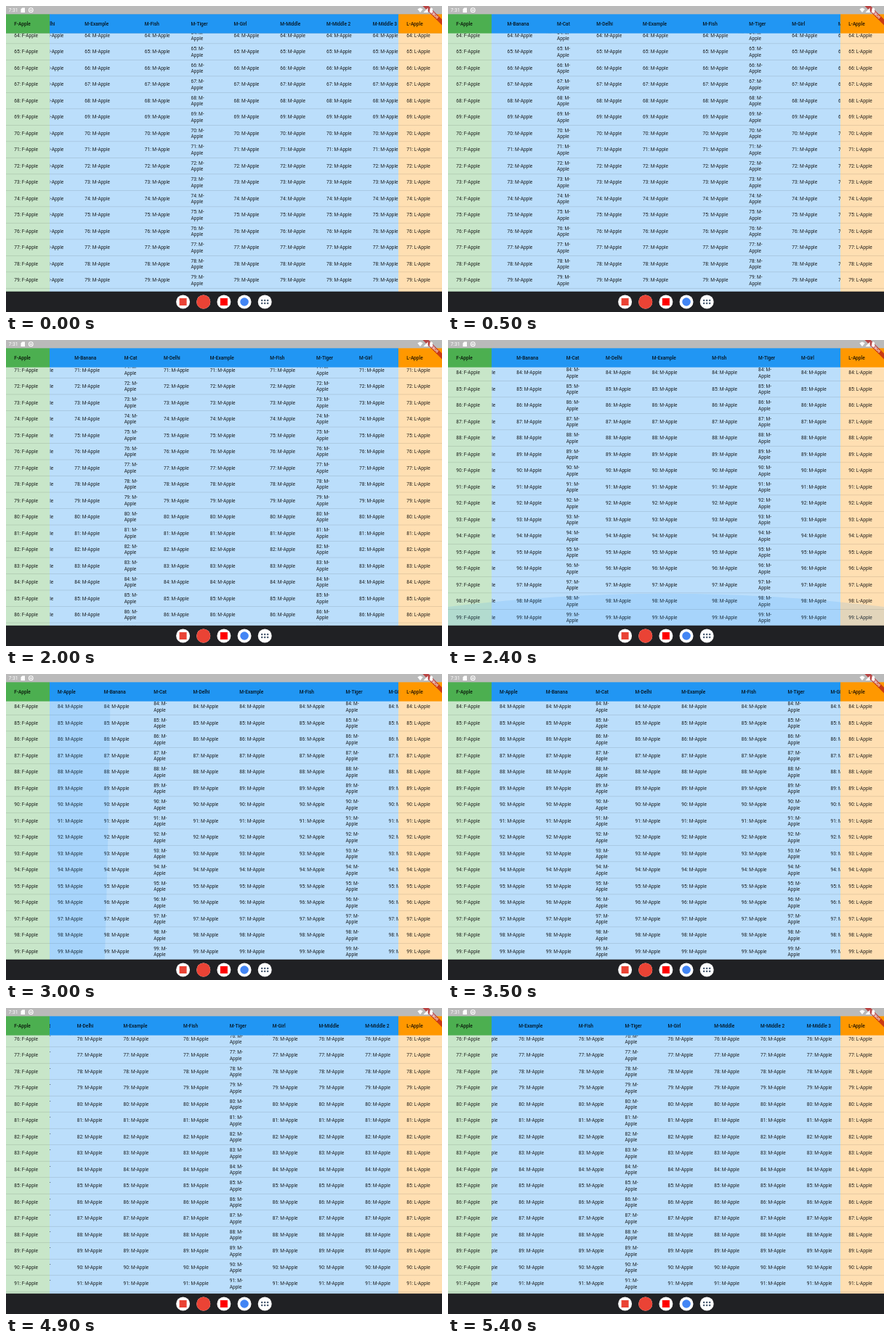
Write an HTML page with a canvas that moves like this. It is 600x422 px and loops after 6900 ms.

```html
<!DOCTYPE html>
<html lang="en">
<head>
<meta charset="utf-8">
<title>Table with fixed columns</title>
<style>
  html, body { margin: 0; width: 100%; height: 100%; overflow: hidden; background: #202124; }
  canvas { display: block; width: 600px; height: 422px; }
</style>
</head>
<body>
<canvas id="stage"></canvas>
<script>
const W = 600, H = 422, LOOP = 6900, STEP = 100;
const TOP = 11.25, BODY = 37.5, BOTTOM = 393.8, LEFT = 60, RIGHT = 540;
const ROW = 22.5, LAST_ROW = 99, LAST_Y = 382.6;
const TEXT_SIZE = 6.56, INK = 'rgba(0,0,0,.87)';
const FONT = 'Roboto, Arial, sans-serif';

const canvas = document.getElementById('stage');
const ctx = canvas.getContext('2d');
const ratio = window.devicePixelRatio || 1;
canvas.width = W * ratio;
canvas.height = H * ratio;

// Columns sit side by side; most share one width and two wrap their text.
const names = ['Apple', 'Banana', 'Cat', 'Delhi', 'Example', 'Fish', 'Tiger', 'Girl', 'Middle', 'Middle 2', 'Middle 3'];
const widths = { Banana: 68.4, Cat: 54.4, Example: 82.5, Tiger: 59 };
let nextX = 71;
const columns = names.map(name => {
  const column = { title: `M-${name}`, x: nextX, wraps: name === 'Cat' || name === 'Tiger' };
  nextX += widths[name] || 63.75;
  return column;
});

const progress = (t, from, to) => Math.min(1, Math.max(0, (t - from) / (to - from)));
const fling = p => 1 - (1 - p) ** 2.66;
const drag = p => p * p * (3 - 2 * p);
const pulse = (t, from, peak, to) => fling(progress(t, from, peak)) * (1 - drag(progress(t, peak, to)));

function scrollX(t) {
  return 213 - 172.5 * fling(progress(t, 0, 800))
    - 40.5 * drag(progress(t, 2500, 2800))
    + 224 * fling(progress(t, 4600, 5400));
}

// Distance from the end of the list.
function scrollY(t) {
  return 445.5 * (1 - drag(progress(t, 1800, 2300))) + 177.4 * drag(progress(t, 3800, 4100));
}

function box(x, y, w, h, color) {
  ctx.fillStyle = color;
  ctx.fillRect(x, y, w, h);
}

function disc(x, y, r, color) {
  ctx.fillStyle = color;
  ctx.beginPath();
  ctx.arc(x, y, r, 0, Math.PI * 2);
  ctx.fill();
}

function polygon(color, ...points) {
  ctx.fillStyle = color;
  ctx.beginPath();
  points.forEach(([x, y]) => ctx.lineTo(x, y));
  ctx.fill();
}

function text(value, x, y, weight = 400, size = TEXT_SIZE, color = INK) {
  ctx.font = `${weight} ${size}px ${FONT}`;
  ctx.fillStyle = color;
  ctx.fillText(value, x, y + size * 0.355);
}

function clipped(x, y, w, h, draw) {
  ctx.save();
  ctx.beginPath();
  ctx.rect(x, y, w, h);
  ctx.clip();
  draw();
  ctx.restore();
}

function panels(y, h, left, middle, right) {
  box(0, y, LEFT, h, left);
  box(LEFT, y, RIGHT - LEFT, h, middle);
  box(RIGHT, y, W - RIGHT, h, right);
}

function eachRow(sy, draw) {
  for (let n = LAST_ROW; n >= 0; n--) {
    const y = LAST_Y - (LAST_ROW - n) * ROW + sy;
    if (y > BODY - ROW && y < BOTTOM + ROW) draw(n, y);
  }
}

function drawBody(sx, sy) {
  const height = BOTTOM - BODY;
  panels(BODY, height, '#c8e6c9', '#bbdefb', '#ffdfb2');
  clipped(0, BODY, W, height, () => eachRow(sy, (n, y) => {
    box(0, y + 10.95, W, 0.6, 'rgba(0,0,0,.16)');
    text(`${n}: F-Apple`, 11.3, y);
    text(`${n}: L-Apple`, 551.2, y);
  }));
  clipped(LEFT, BODY, RIGHT - LEFT, height, () => eachRow(sy, (n, y) => {
    for (const { x, wraps } of columns) {
      if (wraps) {
        text(`${n}: M-`, x - sx, y - 4.2);
        text('Apple', x - sx, y + 4.2);
      } else {
        text(`${n}: M-Apple`, x - sx, y);
      }
    }
  }));
}

function drawHeader(sx) {
  const height = BODY - TOP, y = 24.4;
  panels(TOP, height, '#4caf50', '#2196f3', '#ff9800');
  text('F-Apple', 11.3, y, 500);
  text('L-Apple', 551.2, y, 500);
  clipped(LEFT, TOP, RIGHT - LEFT, height, () => {
    for (const { title, x } of columns) text(title, x - sx, y, 500);
  });
}

// Overscroll glows are flat arcs at the end of the list and at its left edge.
function drawGlows(t) {
  const glowColor = level => `rgba(33,150,243,${0.13 * Math.sqrt(level)})`;
  const bottom = pulse(t, 2200, 2400, 2900);
  const left = pulse(t, 2700, 3000, 3500);
  if (bottom > 0) {
    const arc = [];
    for (let x = 0; x <= W; x += 10) {
      arc.push([x, BOTTOM - 44 * bottom * (1 - (x - W / 2) ** 2 / 217000)]);
    }
    polygon(glowColor(bottom), [0, BOTTOM], ...arc, [W, BOTTOM]);
  }
  if (left > 0) {
    const arc = [];
    for (let y = BODY; y <= BOTTOM; y += 4) {
      arc.push([LEFT + 84.6 * left * (1 - (y + 169) ** 2 / 3050000), y]);
    }
    polygon(glowColor(left), [LEFT, BODY], ...arc, [LEFT, BOTTOM]);
  }
}

function drawBanner() {
  ctx.save();
  ctx.translate(W, 0);
  ctx.rotate(Math.PI / 4);
  box(-19, 13.1, 38, 5.7, 'rgba(183,28,28,.75)');
  ctx.textAlign = 'center';
  text('DEBUG', 0, 15.9, 700, 4.8, '#fff');
  ctx.restore();
}

function drawStatusBar() {
  const white = '#fff';
  box(0, 0, W, TOP, '#bababa');
  drawBanner();
  text('7:31', 3.5, 5.8, 400, 6.8, white);
  polygon(white, [22.3, 2.5], [26, 2.5], [26, 9], [20.5, 9], [20.5, 4.3]);
  disc(34.3, 5.7, 3.4, white);
  disc(34.3, 5.7, 2.4, '#bababa');
  box(32.8, 5, 3, 1.4, white);
  polygon(white, [566.3, 4.2], [570, 2.6], [573.7, 4.2], [570, 9]);
  polygon(white, [580.6, 2.6], [580.6, 9], [574.4, 9]);
  box(583.3, 3.2, 3.8, 6, white);
  box(584.4, 2.5, 1.6, 1, white);
}

function drawDock() {
  const y = 408, iconX = i => 243.6 + 28.15 * i;
  box(0, BOTTOM, W, H - BOTTOM, '#202124');
  for (let i = 0; i < 5; i++) disc(iconX(i), y, 9.5, '#fff');
  box(iconX(0) - 5, y - 5, 10, 10, '#ea4335');
  disc(iconX(1), y, 9.5, '#ea4335');
  box(iconX(2) - 5, y - 5, 10, 10, '#f00');
  disc(iconX(3), y, 5.8, '#4285f4');
  for (const dx of [-4, 0, 4]) {
    for (const dy of [-2, 2]) disc(iconX(4) + dx, y + dy, 1.25, '#44566c');
  }
}

function render(now) {
  const t = Math.floor((now % LOOP) / STEP) * STEP;
  const sx = scrollX(t);
  ctx.setTransform(ratio, 0, 0, ratio, 0, 0);
  drawBody(sx, scrollY(t));
  drawGlows(t);
  drawHeader(sx);
  drawStatusBar();
  drawDock();
}

const start = performance.now();
function tick() {
  render(performance.now() - start);
  requestAnimationFrame(tick);
}
tick();
</script>
</body>
</html>
```
